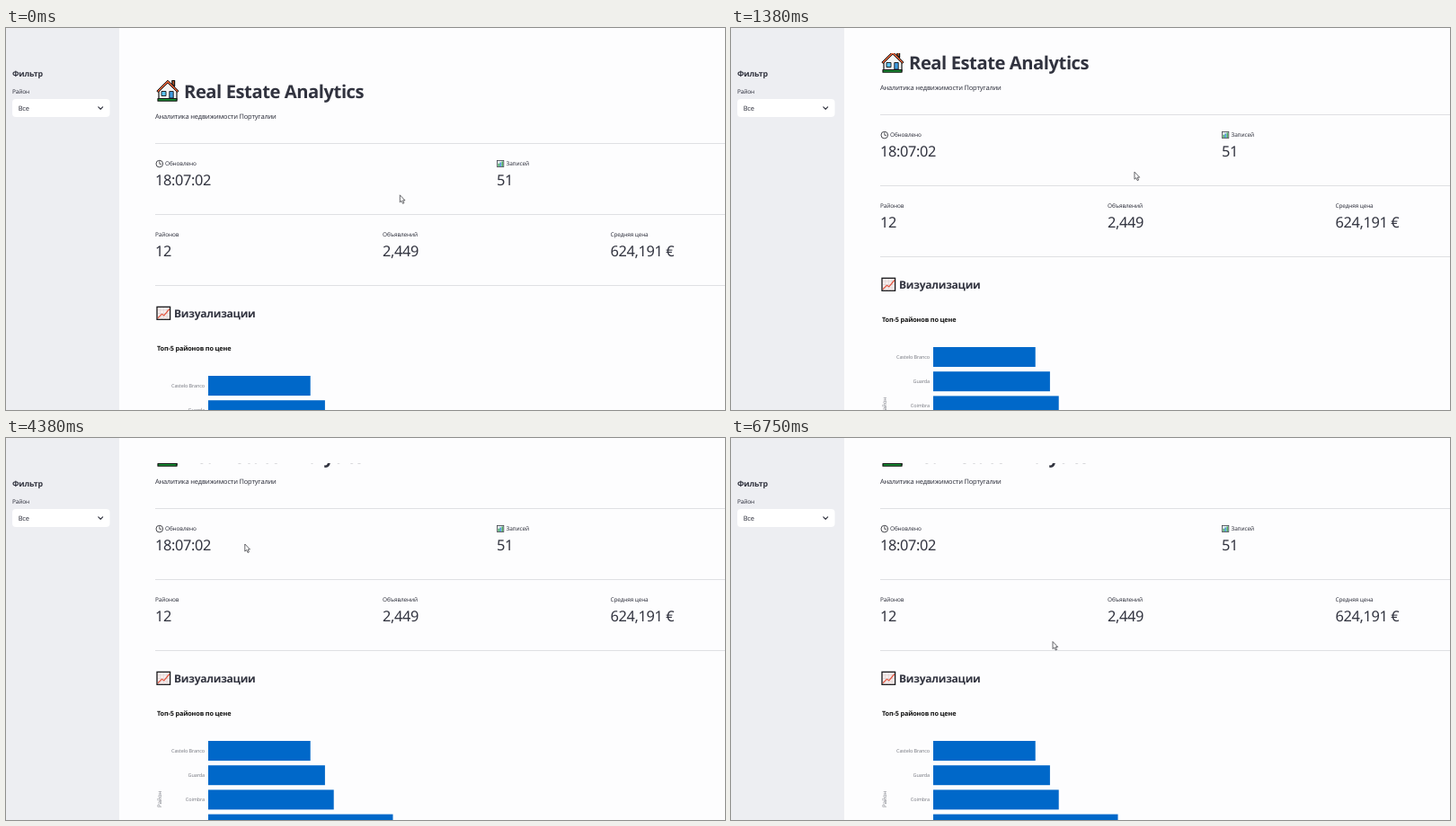
Write an HTML page that moves like this. It is 800x425 px and loops after 8000 ms.

```html
<!DOCTYPE html>
<html lang="ru">
<head>
<meta charset="utf-8">
<title>Real Estate Analytics</title>
<style>
  html, body { margin: 0; width: 100%; height: 100%; overflow: hidden; background: #fdfdfe; }
  svg { display: block; width: 100%; height: 100%; }
  text { font-family: 'Noto Sans', 'Open Sans', sans-serif; fill: #31333f; letter-spacing: -.022em; text-rendering: geometricPrecision; }
  .title { font-size: 20.2px; font-weight: 700; }
  .heading { font-size: 12.05px; font-weight: 600; }
  .filter { font-size: 8.8px; font-weight: 600; }
  .body { font-size: 7.42px; }
  .label { font-size: 6.44px; }
  .value { font-size: 16.35px; }
  .chart-title { font-size: 7.3px; font-weight: 700; fill: #111; }
  .tick { font-size: 5.5px; fill: #7d7f87; text-anchor: end; }
  .axis { font-size: 6.2px; fill: #7d7f87; text-anchor: middle; }
  .rule { stroke: #dfe0e3; stroke-width: 1; }
  .line { fill: none; stroke-linecap: round; stroke-linejoin: round; }
</style>
</head>
<body>
<svg viewBox="0 0 800 425">
  <rect width="800" height="425" fill="#fdfdfe"/>

  <g id="page">
    <g stroke="#161616" stroke-width="1.2" stroke-linejoin="round">
      <path d="M170 69V80H190V69L180 60Z" fill="#f4f4f4"/>
      <path d="M184.8 58.5H187.6V65L184.8 62.5Z" fill="#b4572f"/>
      <path d="M167.8 70.2L180 58.2L192 70.2L190.6 71.4L180 61.2L169.4 71.4Z" fill="#f0643a" stroke-width="1"/>
      <path d="M173 70.5H178V75.5H173Z" fill="#5cc3f2" stroke-width=".9"/>
      <path d="M181.8 70.5H186.2V78H181.8Z" fill="#3f9be0" stroke-width=".9"/>
      <path d="M169 78.6H190V81.2H169Z" fill="#16b83c"/>
    </g>
    <text class="title" x="198" y="77.5">Real Estate Analytics</text>
    <text class="body" x="166" y="100.8">Аналитика недвижимости Португалии</text>

    <path class="rule" d="M166 128.5H800M166 207.5H800M166 286.5H800"/>

    <circle cx="170.8" cy="151.1" r="3.8" fill="#fff" stroke="#33343a" stroke-width=".9"/>
    <path class="line" d="M170.8 148.6V151.3H172.8" stroke="#33343a" stroke-width=".8"/>
    <text class="label" x="177" y="153.4">Обновлено</text>
    <text class="value" x="166" y="174.9">18:07:02</text>

    <rect x="546.6" y="147.4" width="7.2" height="7.2" fill="#e8eef0" stroke="#3c4048" stroke-width=".8"/>
    <path d="M548.3 154V150.8" stroke="#2ba14a" stroke-width="1.3"/>
    <path d="M550.2 154V149.6" stroke="#2a7fd4" stroke-width="1.3"/>
    <path d="M552.2 154V148.5" stroke="#2ba14a" stroke-width="1.3"/>
    <text class="label" x="556.5" y="153.4">Записей</text>
    <text class="value" x="546" y="174.9">51</text>

    <text class="label" x="166" y="232.4">Районов</text>
    <text class="value" x="166" y="253.9">12</text>
    <text class="label" x="419" y="232.4">Объявлений</text>
    <text class="value" x="419" y="253.9">2,449</text>
    <text class="label" x="672.5" y="232.4">Средняя цена</text>
    <text class="value" x="672.5" y="253.9">624,191 €</text>

    <rect x="168" y="310.3" width="14.6" height="14" fill="#fbf1f0" stroke="#17171a" stroke-width="1.3"/>
    <path d="M171.7 311V324M175.3 311V324M179 311V324M169 314H182M169 317.5H182M169 321H182" stroke="#d8cdcf" stroke-width=".6"/>
    <path class="line" d="M169.3 322.4L173.3 318.3L175.8 319.8L181.5 313" stroke="#e2553f" stroke-width="1.2"/>
    <text class="heading" x="187" y="322.2">Визуализации</text>

    <text class="chart-title" x="168" y="359.3">Топ-5 районов по цене</text>
    <g id="bars"></g>
    <text class="axis" transform="translate(173.2 452) rotate(-90)">Район</text>
  </g>

  <rect x="126" width="674" height="28" fill="#fdfdfe"/>

  <rect width="126" height="425" fill="#edeef2"/>
  <text class="filter" x="7" y="53.5">Фильтр</text>
  <text class="label" x="7" y="72.8">Район</text>
  <rect x="7" y="79" width="108.5" height="20" rx="4" fill="#fff"/>
  <text class="body" x="13.7" y="91.6">Все</text>
  <path class="line" d="M102.8 87.9L105.2 90.3L107.6 87.9" stroke="#31333f" stroke-width="1.2"/>
  <path id="collapse" class="line" d="M107.3 10.8L104.6 13.6L107.3 16.4M111 10.8L108.3 13.6L111 16.4" stroke="#62646d" stroke-width="1"/>

  <path id="cursor" d="M.3 .3V8.4L2.1 6.8L3.5 9.8L4.9 9.2L3.6 6.3H6Z" fill="#fff" stroke="#3f4046" stroke-width=".8" stroke-linejoin="round"/>
</svg>
<script>
  const DURATION = 8000, STEP = 125;
  const byId = id => document.getElementById(id);
  const page = byId('page'), cursor = byId('cursor'), collapse = byId('collapse');

  const districts = [['Castelo Branco', 113.7], ['Guarda', 129.9], ['Coimbra', 139.7], ['', 205.5]];
  byId('bars').innerHTML = districts.map(([name, width], i) => {
    const y = 387 + 27.2 * i;
    return `<rect x="225" y="${y}" width="${width}" height="22" fill="#0068c9"/>
      <text class="tick" x="221" y="${y + 13}">${name}</text>`;
  }).join('');

  // Keys are [time, ...values]
  const scrollKeys = [[875, 0], [1000, 3], [1250, 18], [1500, 45], [1625, 50]];
  const cursorKeys = [
    [875, 438, 185.5], [1250, 448, 160.3], [1625, 450, 159], [2000, 455, 157.7],
    [2375, 455, 157.7], [3125, 587, 120.7], [3375, 587, 120.7], [4250, 405, 123],
    [4375, 265.5, 117.7], [4500, 215, 113], [5125, 116, 196], [5375, 116.5, 200.7],
    [6000, 345, 184], [6250, 357.7, 226.2]
  ];

  function valuesAt(keys, t) {
    const next = keys.findIndex(key => key[0] > t);
    if (next === 0) return keys[0].slice(1);
    if (next < 0) return keys[keys.length - 1].slice(1);
    const a = keys[next - 1], b = keys[next];
    const p = (t - a[0]) / (b[0] - a[0]);
    return a.slice(1).map((v, i) => v + (b[i + 1] - v) * p);
  }

  // The screen refreshes eight times a second
  function draw(now) {
    const t = Math.floor(((now + 2) % DURATION) / STEP) * STEP;
    const [scroll] = valuesAt(scrollKeys, t);
    const [x, y] = valuesAt(cursorKeys, t);
    page.setAttribute('transform', `translate(0 ${-Math.round(scroll)})`);
    cursor.setAttribute('transform', `translate(${x} ${y})`);
    collapse.setAttribute('visibility', t >= 5250 && t < 5500 ? 'visible' : 'hidden');
  }

  const start = performance.now();
  function tick() {
    draw(performance.now() - start);
    requestAnimationFrame(tick);
  }
  tick();
</script>
</body>
</html>
```
